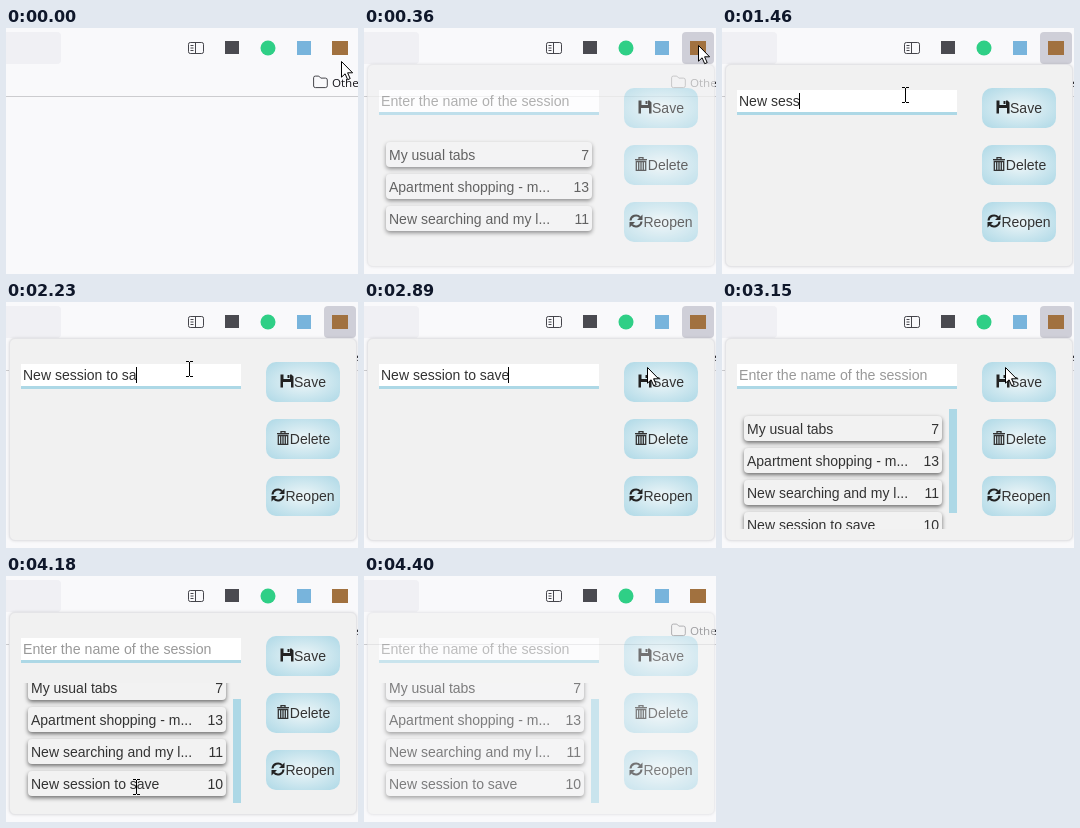
Animation, 352 px wide and 246 px high, one loop 4.44 s. Source, as an HTML page:

```html
<!DOCTYPE html>
<html lang="en">
<head>
<meta charset="utf-8">
<title>Session manager popup</title>
<style>
html, body { margin: 0; width: 100%; height: 100%; overflow: hidden; background: #f9f9fb; }
#stage { position: relative; width: 352px; height: 246px; overflow: hidden; background: #f9f9fb;
  font: 14px/16px "Liberation Sans", Arial, sans-serif; color: #333; cursor: default; }
#stage div, #stage > svg { position: absolute; box-sizing: border-box; white-space: pre; }
#url { left: -6px; top: 4px; width: 61px; height: 32px; border-radius: 4px; background: #f0f0f4; }
#line { left: 0; top: 68px; width: 352px; height: 1px; background: #cccccf; }
#tool { left: 318px; top: 4px; width: 32px; height: 32px; border-radius: 4px; }
#folder { left: 326px; top: 47px; font: 11.6px/16px "Open Sans", sans-serif; color: #15141a; }
#popup { left: 3px; top: 36px; width: 348px; height: 203px; border: 1px solid #e4e4e7;
  border-radius: 6px; background: #f1f1f1; box-shadow: 0 0 3px rgba(0,0,0,.12); }
#panel { left: -4px; top: -37px; width: 352px; height: 246px; }
#field { left: 15px; top: 62px; width: 220px; height: 25px; background: #fff; border-bottom: 3px solid #add8e6; }
#hint, #typed { left: 2px; top: 3px; }
#hint { color: #999; font-size: 14.2px; }
#typed { height: 16px; }
#caret { right: 0; top: 0; width: 1px; height: 16px; background: #000; }
#list { left: 15px; top: 107px; width: 220px; height: 120px; overflow: hidden; }
.row { left: 7px; height: 25px; padding: 5px 3px; border-radius: 4px;
  background: #f2f2f2; box-shadow: 0 2px 4px rgba(0,0,0,.55); }
.row.hover { background: #f4f6f6; box-shadow: 0 0 3px #8cc8dc; transform: scale(1.01); }
.row b { font-weight: normal; position: absolute; right: 3px; }
#thumb { right: 0; width: 8px; height: 104px; background: #add8e6; }
.btn { left: 260px; width: 74px; height: 40px; border-radius: 10px; display: flex;
  align-items: center; justify-content: center;
  background: radial-gradient(#eef6f8, #add8e6); }
.btn svg { width: 14px; height: 14px; margin-top: -2px; }
</style>
</head>
<body>
<div id="stage">
  <div id="url"></div>
  <div id="line"></div>
  <div id="tool"></div>
  <svg width="352" height="70">
    <g fill="none" stroke="#45454b">
      <rect x="182.5" y="14.5" width="15" height="11" rx="1.8"/>
      <path d="M189.5 14.5v11M184.500 17.500h3M184.500 20h3M184.500 22.500h3"/>
      <path d="M307.6 58V49.8q0-1.7 1.7-1.7h3.5l2 2h4.6q1.9 0 1.9 1.9v5.8q0 1.8-1.9 1.8h-9.9q-1.9 0-1.9-1.6z"/>
    </g>
    <rect x="219" y="13" width="14" height="13" fill="#4a4a50"/>
    <circle cx="262" cy="20" r="7.5" fill="#2fcf86"/>
    <rect x="291" y="13" width="14" height="14" fill="#78b4dc"/>
    <rect x="326" y="13" width="16" height="14" fill="#a1713f"/>
  </svg>
  <div id="folder">Other Bookmarks</div>
  <div id="popup"><div id="panel">
    <div id="field"><div id="hint">Enter the name of the session</div><div id="typed"><span id="text"></span><div id="caret"></div></div></div>
    <div id="list"><div id="thumb"></div></div>
    <div class="btn" style="top:60px"><svg viewBox="0 0 14 14"><path fill="#222" fill-rule="evenodd" d="M.5 .5H11.5L13.5 2.5V13.5H.5zM3.5 .5V5H10V.5zM3 8V13.5H11V8z"/><path fill="#222" d="M7.5 1h2v3h-2z"/></svg><span>Save</span></div>
    <div class="btn" style="top:117px"><svg viewBox="0 0 14 14"><path fill="none" stroke="#333" stroke-width="1.3" d="M1 2.7H13M5 2.5V.7H9V2.5M2.3 4.5H11.7V13.3H2.3zM4.7 5V13M7 5V13M9.3 5V13"/></svg><span>Delete</span></div>
    <div class="btn" style="top:174px"><svg viewBox="0 0 14 14"><path fill="none" stroke="#222" stroke-width="2" d="M1.5 6.5A5.5 5.5 0 0 1 11 3.2M12.5 7.5A5.5 5.5 0 0 1 3 10.8"/><path fill="#222" d="M13.5 .5V6H8zM.5 13.5V8H6z"/></svg><span>Reopen</span></div>
  </div></div>
  <svg id="arrow" width="14" height="21"><path d="M.5 .5V16.2L4.1 12.8L6.7 18.7L9.2 17.6L6.6 11.8H11.6z" fill="#fff" stroke="#000"/></svg>
  <svg id="beam" width="9" height="17"><path d="M1 .5H4M5 .5H8M4.5 1V15M1 15.5H4M5 15.5H8" fill="none" stroke="#000"/></svg>
</div>
<script>
const LOOP = 4440, SAVE_AT = 2980, CLOSE_AT = 4180;
const PHRASE = "New session to save";
const $ = id => document.getElementById(id);
const clamp = v => Math.max(0, Math.min(1, v));
const ramp = (t, a, b) => clamp((t - a) / (b - a));
const ease = v => v * v * (3 - 2 * v);

// pointer: time, x, y
const path = [
  [0, 335, 33], [40, 335, 33], [200, 334, 17], [390, 334, 17], [540, 230, 54],
  [820, 183, 67], [2610, 183, 67], [2900, 283, 65], [3270, 283, 65],
  [3650, 141, 153], [3700, 141, 153], [3980, 130, 211], [CLOSE_AT, 130, 211], [4330, 126, 262]
];
// typing: time, letters
const strokes = [
  [969, 0], [970, 1], [1460, 8], [1550, 9], [2000, 15],
  [2080, 16], [2230, 17], [2350, 18], [2400, 19]
];
const sessions = [
  ["My usual tabs", 7], ["Apartment shopping - m...", 13],
  ["New searching and my l...", 11], [PHRASE, 10]
];

function track(keys, t, curve = v => v) {
  const i = keys.findIndex(k => k[0] > t);
  if (i === 0) return keys[0].slice(1);
  if (i < 0) return keys[keys.length - 1].slice(1);
  const a = keys[i - 1], b = keys[i], f = curve((t - a[0]) / (b[0] - a[0]));
  return a.slice(1).map((v, n) => v + (b[n + 1] - v) * f);
}

const rows = sessions.map(([name, count]) => {
  const el = document.createElement("div");
  const num = document.createElement("b");
  num.textContent = count;
  el.className = "row";
  el.append(name, num);
  $("list").append(el);
  return el;
});

function show(el, on) { el.style.display = on ? "" : "none"; }

function drawList(t, query, x, y) {
  const saved = t >= SAVE_AT;
  const scroll = Math.round(15 * ease(ramp(t, 3560, 3690)));
  let slot = 0;
  rows.forEach((el, i) => {
    const on = (i < 3 || saved) && sessions[i][0].toLowerCase().includes(query.toLowerCase());
    show(el, on);
    if (!on) return;
    const top = 7 + 32 * slot++ - scroll;
    const dy = y - 107 - top;
    el.style.top = top + "px";
    el.style.width = (saved ? 198 : 206) + "px";
    el.classList.toggle("hover", t < CLOSE_AT && x > 22 && x < 220 && y > 107 && dy >= 0 && dy < 25);
  });
  show($("thumb"), saved);
  $("thumb").style.top = scroll * 16 / 15 + "px";
}

function drawPointer(x, y, open) {
  const inField = x > 15 && x < 235 && y > 60 && y < 87;
  const inList = x > 22 && x < 220 && y > 107 && y < 227;
  const beam = open && (inField || inList);
  show($("arrow"), !beam);
  show($("beam"), beam);
  const el = beam ? $("beam") : $("arrow");
  el.style.left = Math.round(x) - (beam ? 4 : 0) + "px";
  el.style.top = Math.round(y) - (beam ? 8 : 0) + "px";
}

function draw(t) {
  const [x, y] = track(path, t, ease).map(Math.round);
  const typing = t >= 970 && t < SAVE_AT;
  const query = typing ? PHRASE.slice(0, Math.floor(track(strokes, t)[0] + 1e-6)) : "";
  const alpha = Math.min(ramp(t, 270, 390), 1 - ramp(t, 4335, 4510));

  $("popup").style.opacity = alpha;
  $("tool").style.background =
    t >= 260 && t < CLOSE_AT ? "#cfcfd8" : t >= 60 && t < 260 ? "#e0e0e6" : "none";
  $("text").textContent = query;
  show($("hint"), !query);
  show($("typed"), typing);
  drawList(t, query, x, y);
  drawPointer(x, y, alpha > 0.9);
}

const start = performance.now();
function tick() {
  draw((performance.now() - start) % LOOP);
  requestAnimationFrame(tick);
}
tick();
</script>
</body>
</html>
```
